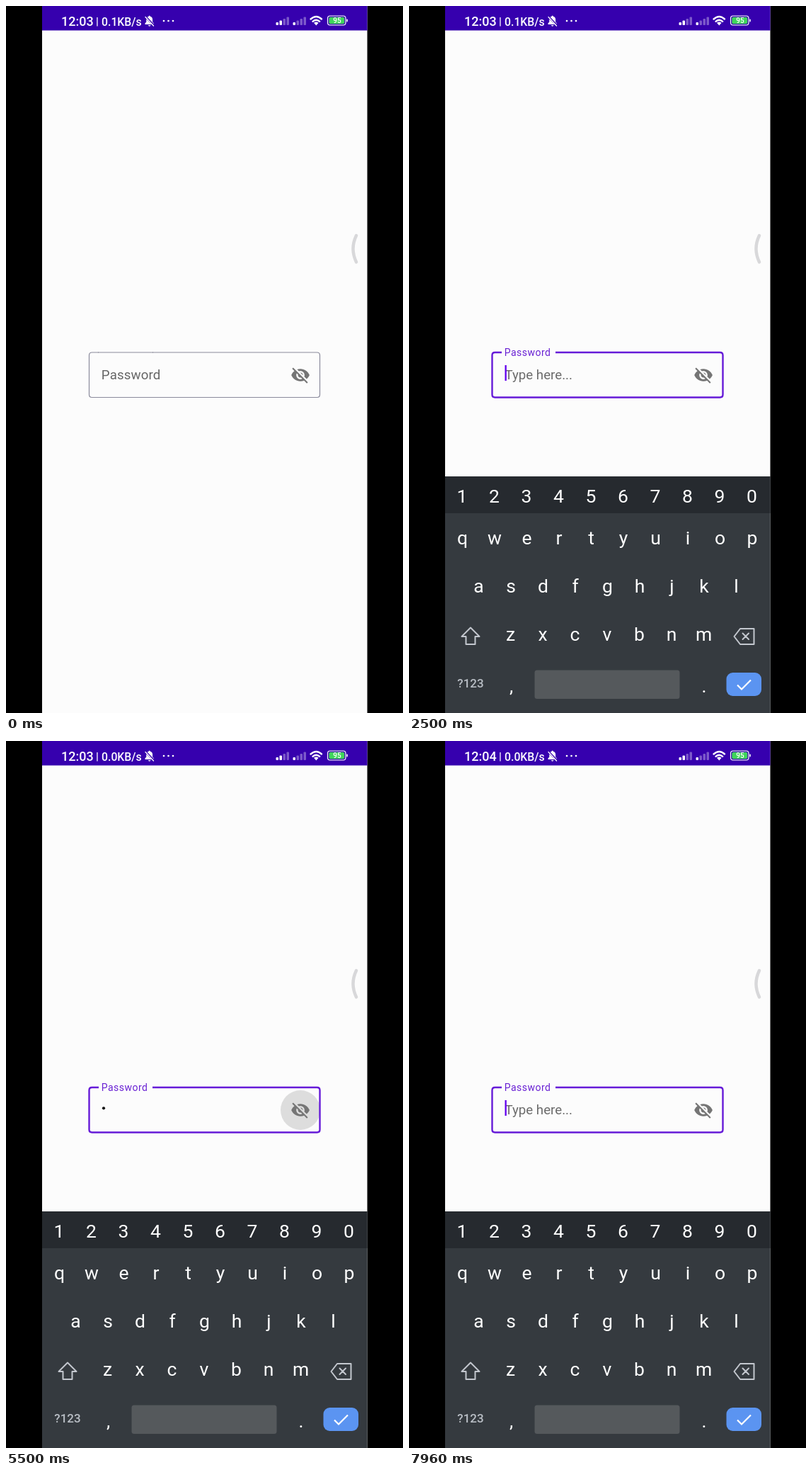
These frames come from a looping animation (561x998 px, 8000 ms). An HTML page:

```html
<!DOCTYPE html>
<html lang="en">
<head>
<meta charset="utf-8">
<title>Password field</title>
<style>
  html, body { margin: 0; width: 561px; height: 998px; overflow: hidden; background: #000; }
  svg { display: block; font-family: Roboto, sans-serif; }
  .line { fill: none; stroke-linecap: round; stroke-linejoin: round; }
  .bold { font-weight: 500; }
</style>
</head>
<body>
<svg width="561" height="998" viewBox="0 0 561 998">
  <rect x="51" width="459.5" height="998" fill="#fcfcfc"/>

  <g id="status" fill="#fff">
    <rect x="51" width="459.5" height="34.5" fill="#3600ae"/>
    <text id="clock" class="bold" x="78" y="28" font-size="18"></text>
    <text class="bold" x="127" y="27" font-size="15.5">|</text>
    <text id="speed" class="bold" x="135" y="27.5" font-size="15.8"></text>
    <path d="M196.500 26v-1.500l1.800-2v-3.500q0-3.500 3.400-4.200v-1h2v1q3.400.7 3.400 4.200v3.500l1.800 2v1.500zM200.800 27h3.800q-1.900 3.500-3.800 0z"/>
    <path class="line" d="M196.500 14.500l13 13.500" stroke="#3600ae" stroke-width="3"/>
    <path class="line" d="M197 15.500l11.500 12.500" stroke="#fff" stroke-width="1.300"/>
    <path class="line" d="M223 21h.01M229.500 21h.01M236 21h.01" stroke="#fff" stroke-width="2.700"/>
    <g class="line" stroke="#fff" stroke-width="2.400">
      <path d="M430.500 18.500q8-7 15.500 0M433.500 21.800q5-4.300 9.700 0"/>
    </g>
    <path d="M435 23.800q3.300-2.500 6.600 0l-3.300 3.700z"/>
    <rect x="454.500" y="14" width="25.500" height="13" rx="3.500" fill="none" stroke="#fff" stroke-width="1.200"/>
    <rect x="456.300" y="15.800" width="21.900" height="9.400" rx="2" fill="#3fd55b"/>
    <rect x="481.300" y="18.500" width="1.500" height="4" rx=".7"/>
    <text class="bold" x="468" y="24.300" font-size="10" text-anchor="middle">95</text>
  </g>

  <path class="line" d="M495 324q-9 18.500 0 37.500" stroke="#d8d8da" stroke-width="4.500"/>

  <circle id="ripple" cx="416" cy="521" fill="#000"/>
  <g id="border" class="line">
    <path d="M207 489H439.500q4 0 4 4V548.500q0 4-4 4H121.500q-4 0-4-4V493q0-4 4-4H131" stroke-linecap="butt"/>
    <path id="gap" d="M130 489H208" stroke-linecap="butt"/>
  </g>
  <text id="label" x="134.800"></text>
  <text id="hint" x="135.500" y="527" font-size="18.700" fill="#6b6b6b">Type here...</text>
  <circle id="dot" cx="138" cy="518.300" r="2.100" fill="#111"/>
  <rect id="cursor" y="507" width="2.300" height="22" fill="#6200ee"/>
  <path transform="translate(402 507) scale(1.17)" fill="#757575" d="M12 7c2.760 0 5 2.240 5 5 0 .65-.13 1.260-.36 1.830l2.920 2.920c1.510-1.260 2.700-2.890 3.430-4.750-1.730-4.390-6-7.500-11-7.500-1.400 0-2.740.25-3.980.7l2.160 2.160C10.740 7.130 11.350 7 12 7zM2 4.270l2.740 2.740C3.080 8.300 1.780 10.020 1 12c1.730 4.390 6 7.500 11 7.500 1.550 0 3.030-.3 4.380-.84L19.730 22 21 20.730 3.270 3zM7.530 9.800l1.550 1.550c-.05.21-.08.43-.08.65 0 1.660 1.340 3 3 3 .22 0 .44-.03.65-.08l1.550 1.550c-.67.33-1.410.53-2.200.53-2.760 0-5-2.240-5-5 0-.79.2-1.530.53-2.200zm4.310-.78l3.150 3.150.02-.16c0-1.660-1.340-3-3-3z"/>

  <g id="keyboard">
    <rect x="51" y="664" width="459.500" height="334" fill="#353a3f"/>
    <rect x="51" y="664" width="459.500" height="52" fill="#262a2f"/>
    <g id="keys" fill="#fff" font-size="26.500" text-anchor="middle"></g>
    <g class="line" stroke="#c3c7ce" stroke-width="2">
      <path d="M87 877.500L99.500 890H93.500V901H80.500V890H74.500z"/>
      <path d="M468 879H487.500V901H468L459.500 890zM471.500 885.500l8.500 8.500m0-8.500l-8.500 8.500"/>
    </g>
    <text class="bold" x="87" y="962" font-size="17" text-anchor="middle" fill="#b9bec5">?123</text>
    <rect x="177.500" y="937.500" width="205" height="40.500" rx="3.500" fill="#55595c"/>
    <rect x="448.500" y="941" width="49.500" height="33" rx="9" fill="#5b94f1"/>
    <path d="M464 958.500l6 6 13-13" fill="none" stroke="#fff" stroke-width="2.200"/>
  </g>

  <g id="touch">
    <circle cx="460" cy="889.500" r="14" fill="#000" opacity=".18"/>
    <circle cx="460" cy="889.500" r="12" fill="#ddd" opacity=".75"/>
    <path class="line" d="M467 880.500l-7.500 9.500 7.500 9.500" stroke="#eee" stroke-width="1.500"/>
  </g>
</svg>
<script>
const LOOP = 8000;
const FOCUS = 1420, TYPED = 2770, DELETED = 6870;
const SVG = 'http://www.w3.org/2000/svg';
const $ = id => document.getElementById(id);

function add(parent, tag, attrs, text = '') {
  const el = parent.appendChild(document.createElementNS(SVG, tag));
  for (const name in attrs) el.setAttribute(name, attrs[name]);
  el.textContent = text;
}

// Each row: characters, first centre, baseline.
for (const [chars, x, y] of [
  ['1234567890', 75, 701], ['qwertyuiop', 75.500, 759.500],
  ['asdfghjkl', 98.500, 827.500], ['zxcvbnm', 143.500, 896]
]) [...chars].forEach((c, i) => add($('keys'), 'text', { x: x + 45.500 * i, y }, c));
add($('keys'), 'text', { x: 144.500, y: 969 }, ',');
add($('keys'), 'text', { x: 417, y: 969 }, '.');

// Two signal meters with a different number of lit bars.
for (const [x, lit] of [[381.500, 2], [405.500, 1]])
  for (let i = 0; i < 4; i++) {
    const height = 4 + 2.500 * i;
    add($('status'), 'rect', { x: x + 5 * i, y: 27 - height, width: 3.500, height, rx: 1, opacity: i < lit ? 1 : .35 });
  }

const set = (id, attrs) => { for (const name in attrs) $(id).setAttribute(name, attrs[name]); };
const show = (id, on) => { $(id).style.display = on ? '' : 'none'; };
const ramp = (t, start, length) => Math.min(1, Math.max(0, (t - start) / length));
const smooth = p => p * p * (3 - 2 * p);
const easeOut = p => 1 - (1 - p) ** 2;
const mix = (a, b, p) => a + (b - a) * p;

$('label').textContent = 'Password';

function draw(t) {
  const focused = t >= FOCUS;
  const filled = t >= TYPED && t < DELETED;

  $('clock').textContent = t < 6500 ? '12:03' : '12:04';
  $('speed').textContent = t < 4330 ? '0.1KB/s' : '0.0KB/s';

  const lift = smooth(ramp(t, FOCUS, 167));
  set('label', {
    y: mix(527, 493.500, lift),
    'font-size': mix(18.700, 14, lift),
    'letter-spacing': mix(.15, .47, lift),
    fill: focused ? '#6a22d4' : '#666'
  });
  set('border', { stroke: focused ? '#661bd8' : '#8b8b9c', 'stroke-width': focused ? 2.400 : 1.200 });
  show('gap', lift < 1);

  const hintStart = t < TYPED ? FOCUS : DELETED;
  set('hint', { opacity: filled ? 0 : ramp(t, hintStart + 90, 87) });
  show('dot', filled);

  const blinkStart = t < TYPED ? FOCUS : filled ? TYPED : DELETED;
  show('cursor', focused && Math.floor((t - blinkStart) / 500) % 2 === 0);
  set('cursor', { x: filled ? 141 : 135.500 });

  set('ripple', {
    r: 28 * easeOut(ramp(t, 5260, 225)),
    opacity: .12 * (1 - ramp(t, 5600, 150))
  });
  set('keyboard', { transform: `translate(0 ${334 * (1 - easeOut(ramp(t, 1470, 280)))})` });
  show('keyboard', t > 1470);
  show('touch', t >= 6760 && t < DELETED);
}

const begin = performance.now();
function tick() {
  draw((performance.now() - begin) % LOOP);
  requestAnimationFrame(tick);
}
tick();
</script>
</body>
</html>
```
